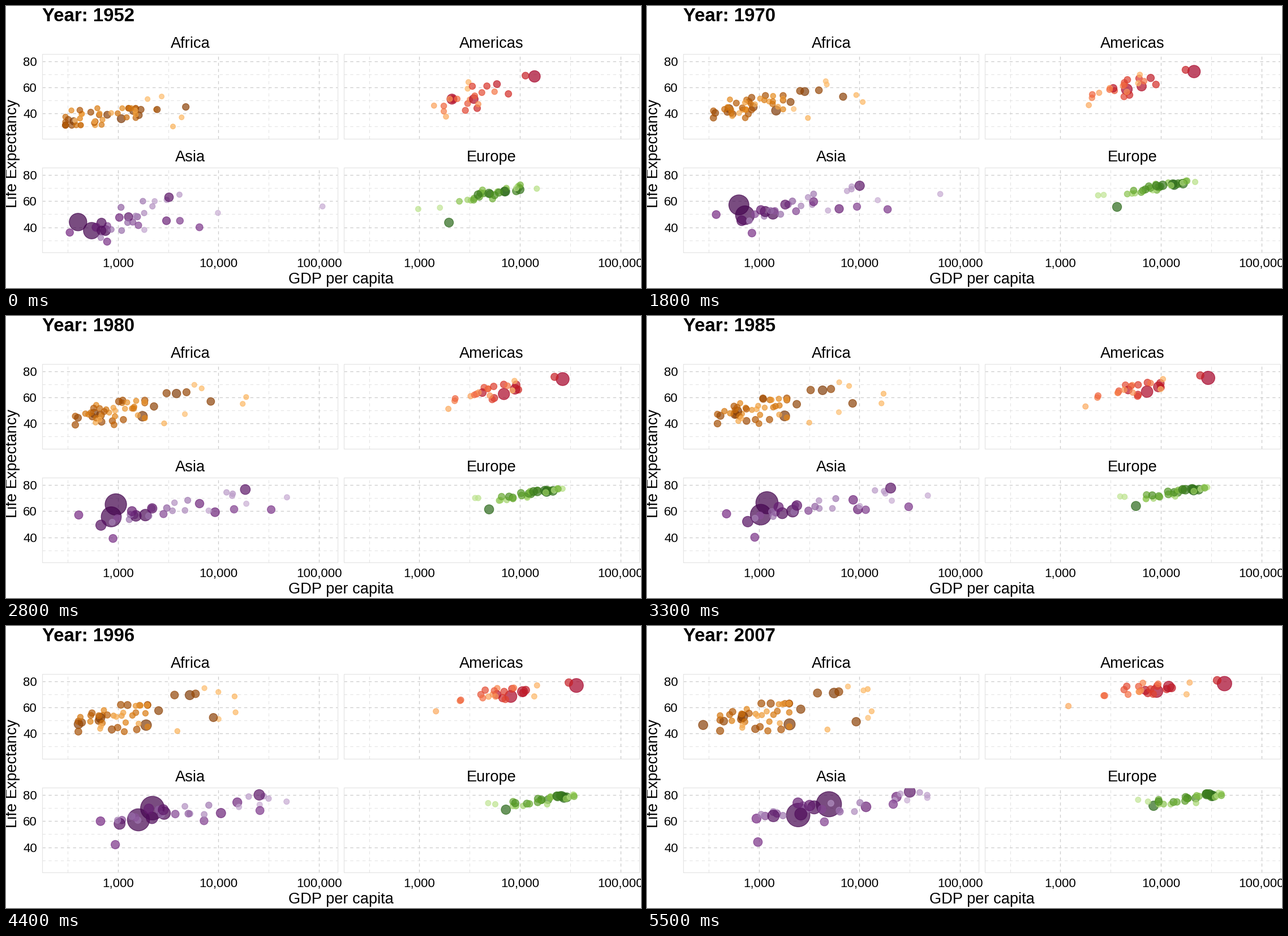
Animation, 1122 px wide and 499 px high, one loop 5.6 s. Source, as a matplotlib script:

```python
import numpy as np
import matplotlib.pyplot as plt
from matplotlib.animation import FuncAnimation
from matplotlib.colors import LinearSegmentedColormap
from matplotlib.patches import Rectangle

plt.rcParams["font.family"] = "Liberation Sans"

W, H, DPI = 1122, 499, 100
PT = 72 / DPI
START, END = 1952, 2007
PW, PH = 522, 149.8
DECADE, LIFE = 177.55, 2.308
LOG_LEFT, LIFE_TOP = 2.2485, 85.55

rng = np.random.default_rng(11)

fig = plt.figure(figsize=(W / DPI, H / DPI), dpi=DPI, facecolor="white")
ax = fig.add_axes([0, 0, 1, 1])
ax.set(xlim=(0, W), ylim=(H, 0))
ax.axis("off")


def label(x, y, text, px, ha="center", **kw):
    return ax.text(x, y, text, fontsize=px * PT, ha=ha, va="baseline",
                   color="black", **kw)


def dash(xs, ys, major):
    lw, color = (1.3, "#cccccc") if major else (1, "#e2e2e2")
    ax.plot(xs, ys, color=color, lw=lw * PT, zorder=1 + major / 10,
            dashes=(5.4 / lw, 5.4 / lw), dash_capstyle="butt")


def radius(pop):
    return 4.2 + 18.2 * np.sqrt(pop / 1319)


def crowd(n, noise, *ranges):
    """Seeded (gdp, life) paths; richer countries also tend to live longer."""
    rows = []
    for u in rng.permutation((np.arange(n) + 0.5) / n):
        row = []
        for k, (lo, hi) in enumerate(ranges):
            v = np.clip(u + rng.normal(0, noise), 0, 1)
            row.append(lo + (hi - lo) * v if k % 2 else lo * (hi / lo) ** v)
        rows.append(row)
    return rows


class Panel:
    def __init__(self, name, left, top, rows, ramp, big, pop, decay, growth, bend):
        self.left, self.top, self.bend = left, top, bend
        n = len(rows)
        rank = np.r_[0, 1, 2 + rng.permutation(n - 2)]
        self.rows = [np.reshape(rows[i], (-1, 2)) for i in rank]
        pops = pop * np.exp(-decay * np.arange(n))
        pops[:len(big)] = big
        self.r0, self.r1 = radius(pops[rank] * growth), radius(pops[rank])
        cmap = LinearSegmentedColormap.from_list(name, ramp.split())
        colors = cmap(0.8 * rank / (n - 1))
        colors[:, 3] = 0.7

        self.draw_grid()
        label(left + PW / 2, top - 11, name, 27.3)
        self.dots = ax.scatter(np.zeros(n), np.zeros(n), c=colors,
                               edgecolors=colors, linewidths=1.2 * PT, zorder=3)
        self.dots.set_clip_path(Rectangle((left, top), PW, PH,
                                          transform=ax.transData))

    def x(self, log_gdp):
        return self.left + (log_gdp - LOG_LEFT) * DECADE

    def y(self, life):
        return self.top + (LIFE_TOP - life) * LIFE

    def draw_grid(self):
        right, bottom = self.left + PW, self.top + PH
        for g in np.arange(2.5, 5.1, 0.5):
            dash([self.x(g)] * 2, [bottom, self.top], g % 1 == 0)
        for life in range(30, 81, 10):
            dash([self.left, right], [self.y(life)] * 2, life % 20 == 0)
        ax.add_patch(Rectangle((self.left, self.top), PW, PH, fill=False,
                               ec="#e5e5e5", lw=1.3 * PT, zorder=4))

    def place(self, row, t):
        if len(row) == 2:
            t = 1 - (1 - t) ** self.bend
        keys = np.linspace(0, 1, len(row))
        return (self.x(np.interp(t, keys, np.log10(row[:, 0]))),
                self.y(np.interp(t, keys, row[:, 1])))

    def update(self, t):
        r = self.r0 + (self.r1 - self.r0) * t
        self.dots.set_offsets([self.place(row, t) for row in self.rows])
        self.dots.set_sizes((2 * r * PT) ** 2)


# Rows hold gdp, life pairs evenly spaced in time, most populous first.
africa = [
    (1077, 36, 1750, 45.5, 2014, 47),
    (1419, 42, 5581, 71),
    (362, 34, 691, 53),
    (781, 39, 880, 45, 520, 47.5, 278, 46.5),
    (4725, 45, 8361, 57, 9270, 49),
    (1616, 38.6, 2602, 58.6),
    (1688, 43, 3820, 71),
    (2449, 43, 6223, 72),
    *crowd(38, 0.35, (300, 1500), (31, 44), (410, 2000), (42, 63)),
    (3521, 30, 2850, 40, 4797, 43),
    (2388, 43, 19000, 60, 12057, 74),
    (4293, 37, 17500, 55, 13206, 57),
    (1968, 51, 10957, 73),
    (2719, 53, 7670, 76),
    (376, 34.5, 12154, 52),
]

americas = [
    (13990, 68.4, 42952, 78.2),
    (2109, 51, 6900, 62.4, 9066, 72.4),
    (3478, 51, 8900, 66, 11978, 76),
    (2144, 51, 7007, 73),
    (5911, 62.5, 12779, 75),
    (11367, 69, 36319, 80.7),
    (3759, 44, 7409, 71),
    (7690, 55, 11416, 74),
    *crowd(13, 0.2, (1750, 5600), (40, 61), (2700, 11500), (69, 79)),
    (1398, 46, 6025, 72),
    (1840, 37.6, 1960, 51, 1202, 61),
    (3082, 64, 19329, 79),
    (3023, 59, 18009, 70),
]

asia = [
    (400, 44, 500, 46, 720, 63.5, 1200, 66.5, 2200, 70, 4959, 73),
    (547, 37.4, 840, 55.5, 2452, 64.7),
    (750, 37.5, 3541, 70.6),
    (685, 43.4, 2606, 65.5),
    (684, 37.5, 667, 49, 1391, 64),
    (3217, 63, 18300, 76.5, 31656, 82.6),
    (1273, 48, 3190, 72),
    (605, 40, 2442, 74),
    (3035, 45, 9200, 59, 11606, 71),
    (1031, 47.5, 23348, 78.6),
    (331, 36, 400, 57, 944, 62),
    (779, 29, 890, 39, 975, 44),
    (6460, 40, 33700, 61, 21655, 73),
    (4130, 45, 14600, 61.5, 4471, 59.5),
    *crowd(13, 0.2, (550, 2200), (32, 60), (1050, 12500), (60, 75)),
    (3054, 61, 39725, 82),
    (4087, 65, 25523, 81),
    (2315, 60, 47143, 80),
    (1828, 38, 22316, 76),
    (108382, 56, 48000, 70.5, 47307, 78),
    (9867, 51, 29796, 76),
]

europe = [
    (7144, 67.5, 32170, 79.4),
    (1969, 43.6, 8458, 71.8),
    (7030, 67.4, 30470, 80.7),
    (9980, 69, 33203, 79.4),
    (4931, 66, 28570, 80.5),
    (3834, 65, 28821, 81),
    *crowd(21, 0.12, (2500, 10100), (59, 72.5), (9500, 40000), (73, 81)),
    (14734, 69.6, 37506, 81.7),
    (974, 54, 3800, 70, 7446, 75),
    (1601, 55, 3550, 70, 5937, 76.4),
]

COLS, TOPS = (64.5, 597), (85, 286.4)
panels = [
    Panel("Africa", COLS[0], TOPS[0], africa,
          "#7F3B08 #B35806 #E08214 #FDB863 #FEE0B6",
          [135, 80, 76, 65], 70, 0.1, 0.27, 1.8),
    Panel("Americas", COLS[1], TOPS[0], americas,
          "#A50026 #D73027 #F46D43 #FDAE61 #FEE090",
          [301, 190, 109], 65, 0.15, 0.48, 1.2),
    Panel("Asia", COLS[0], TOPS[1], asia,
          "#40004B #762A83 #9970AB #C2A5CF #E7D4E8",
          [1319, 1110, 223], 270, 0.15, 0.39, 1.25),
    Panel("Europe", COLS[1], TOPS[1], europe,
          "#276419 #4D9221 #7FBC41 #B8E186 #E6F5D0",
          [82, 71, 61, 60, 58], 80, 0.13, 0.78, 1.4),
]

for p in panels[::2]:
    for life in (40, 60, 80):
        label(55, p.y(life) + 8, str(life), 22.3, ha="right")
for p in panels[2:]:
    for g in (3, 4, 5):
        label(p.x(g), 462, f"{10 ** g:,}", 22.3)
label(592, 491, "GDP per capita", 27.3)
label(19.5, 260.5, "Life Expectancy", 27.3, rotation=90,
      rotation_mode="anchor")
title = label(64, 27, "", 33, ha="left", weight="bold")


def draw(i):
    title.set_text(f"Year: {START + i}")
    for p in panels:
        p.update(i / (END - START))
    return [title, *(p.dots for p in panels)]


anim = FuncAnimation(fig, draw, frames=END - START + 1, interval=100,
                     repeat=True, repeat_delay=0, blit=False)
plt.show()
```
